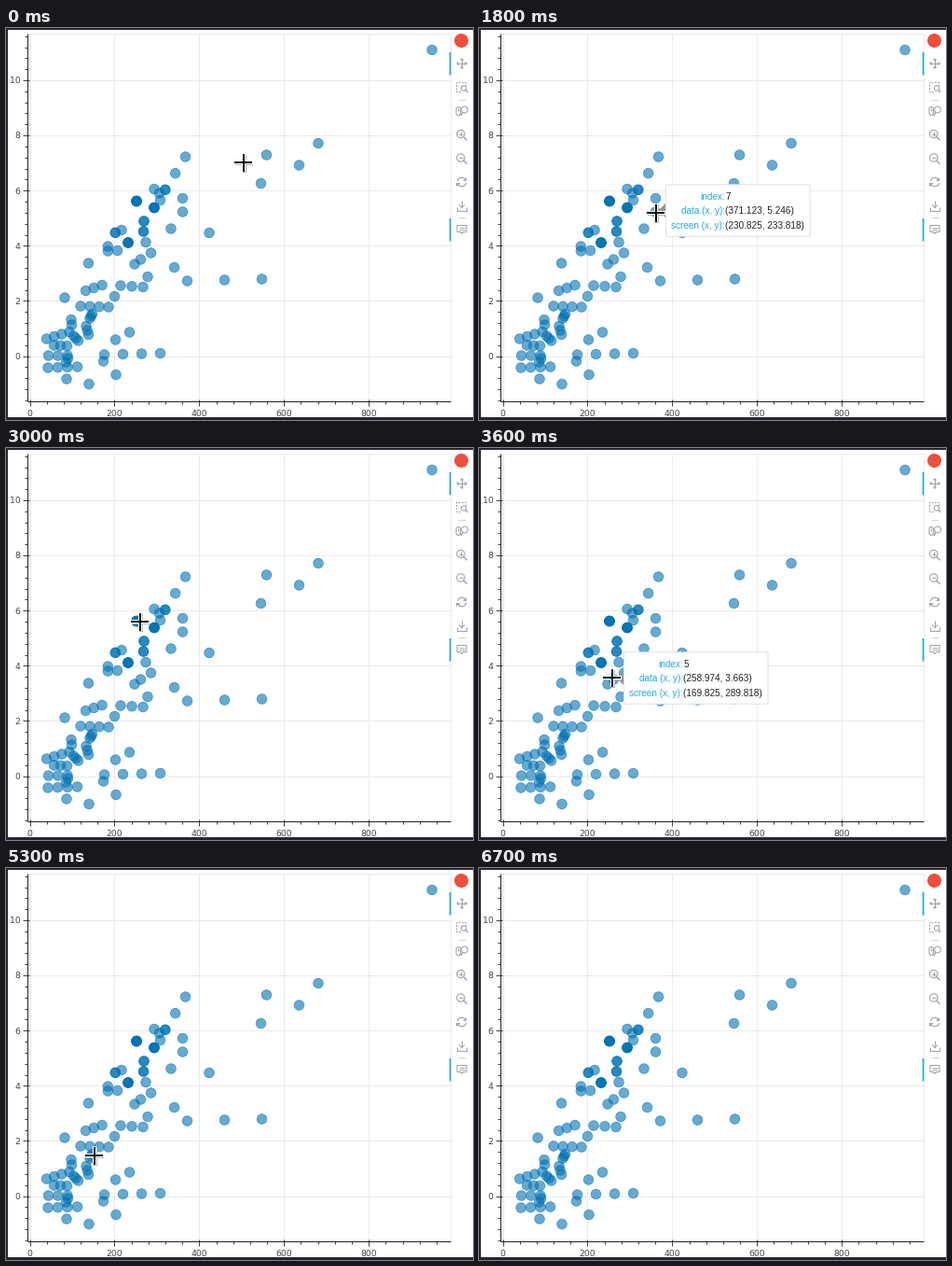
These frames come from a looping animation (501x420 px, 7.1 s). A matplotlib script:

```python
import numpy as np
import matplotlib.pyplot as plt
from matplotlib.animation import FuncAnimation
from matplotlib.patches import Arc, Circle, FancyBboxPatch, Polygon, Rectangle

W, H, DPI = 501, 420, 64
PT = 72 / DPI                      # points per pixel
STEP, FRAMES = 100, 71
X0, XS, Y0, YS = 25.6, 0.4545, 351.6, 29.56
LEFT, RIGHT, TOP, BOTTOM = 23.5, 477.5, 5.5, 399.5
DOT, TEAL, ICON, GRID, INK = '#0072b5', '#26aae1', '#a1a6a9', '#eaeaea', '#222222'

LONE = [
    (457, 23.5), (335, 123.5), (314.5, 147), (279.5, 136), (273.5, 166.5),
    (144.5, 248), (189.5, 182.5), (189.5, 197), (218, 219.5), (177, 215),
    (180.5, 256.5), (159, 172.5), (164.5, 177), (165.5, 184.5), (138, 253),
    (155.5, 241), (150, 229.5), (152, 266.5), (109.3, 234), (109.3, 239),
    (119.5, 238.5), (124, 216.5), (88.5, 252), (63, 289), (116.5, 287.5),
    (70, 312.5), (70.5, 318), (104.5, 357), (118, 371.5), (65, 376),
    (89, 381.5), (117.5, 334), (132.5, 326), (66.5, 354), (64.5, 358),
]
# x, y, copies
STACKS = [(140, 185.5, 6), (159, 192.5, 4), (131, 230, 4), (148, 207, 2),
          (147.5, 218, 2), (117.3, 219.3, 2), (170.8, 173.3, 1)]
# evenly spaced dots between two ends: x, y, x, y, count
CHAINS = [
    (192.5, 138, 170.8, 173.3, 3), (194.5, 271, 274.5, 269, 3),
    (105.5, 350, 165.5, 348.5, 4), (147, 277.5, 123, 276, 3),
    (85.5, 281.5, 103, 275.5, 3), (80, 298, 110, 299, 4),
    (92.5, 306.5, 90, 311, 3), (86, 319.5, 88.5, 328.5, 3),
    (72.5, 330, 77.5, 335, 3), (43.5, 333, 68, 325.5, 4),
    (51.5, 340, 65.5, 340.5, 3), (45.5, 351, 66, 351, 3),
    (45, 364, 76.5, 363, 4),
]
DOTS = np.vstack([LONE]
                 + [[(x, y)] * n for x, y, n in STACKS]
                 + [np.linspace(c[:2], c[2:4], c[4]) for c in CHAINS])

# pointer path: ms, x, y
PATH = np.array([
    (0, 255, 144), (400, 282, 138), (600, 282, 138), (900, 272, 168),
    (1000, 272, 168), (1100, 253, 178), (1800, 190, 198), (2000, 184, 191),
    (2100, 184, 191), (2200, 188, 184), (2400, 179, 182), (2600, 179, 182),
    (2900, 154, 182), (3000, 144, 186), (3150, 144, 187), (3400, 149, 228),
    (3550, 143.2, 243.3), (3600, 143, 246), (3900, 151, 265), (4000, 151, 267),
    (4450, 146.5, 277.56), (4500, 145, 278), (4750, 138, 254), (5000, 112, 299),
    (5100, 111, 300), (5200, 103, 306), (5300, 95, 308), (5450, 92.5, 309),
    (5800, 76, 332), (6000, 76, 332), (6100, 71, 338), (6300, 71, 338),
    (6400, 92, 240), (6600, 138, 10),
])
GONE = 6700                        # pointer has left the stage
LAG = 50                           # hover box trails the pointer
REACH = 5.7                        # hover distance around a dot

fig = plt.figure(figsize=(W / DPI, H / DPI), dpi=DPI, facecolor='white')
ax = fig.add_axes([0, 0, 1, 1])
ax.set_xlim(0, W)
ax.set_ylim(H, 0)
ax.axis('off')


def line(xs, ys, color, width=1.0, z=1, **kw):
    kw.setdefault('solid_capstyle', 'butt')
    return ax.plot(xs, ys, color=color, lw=width * PT, zorder=z, **kw)[0]


def label(x, y, s, size, color, ha, font, z=3):
    return ax.text(x, y, s, fontsize=size * PT, color=color, ha=ha,
                   va='baseline', family=font, zorder=z)


def shape(patch):
    return ax.add_patch(patch)


def draw_plot():
    for x, y, w, h in [(0, 0, W, 2), (0, 0, 2, H), (0, 417, W, 3)]:
        shape(Rectangle((x, y), w, h, color='#262633', lw=0, zorder=0))
    line([LEFT, RIGHT, RIGHT], [TOP, TOP, BOTTOM], GRID)
    for x, y in DOTS:
        shape(Circle((x, y), 5.3, color=DOT, alpha=0.6, lw=0.8 * PT, zorder=2))

    line([LEFT, LEFT], [TOP, BOTTOM], INK, z=3)
    line([LEFT, RIGHT], [BOTTOM, BOTTOM], INK, z=3)
    for k in range(25):
        x, major = X0 + XS * 40 * k, k % 5 == 0
        line([x, x], [BOTTOM - 2 * major, BOTTOM + 3.4 + 1.6 * major], INK, 0.85, 3)
        if major:
            line([x, x], [TOP, BOTTOM], GRID)
            label(x, 416, str(40 * k), 9.2, '#444444', 'center', 'DejaVu Sans')
    for k in range(-4, 30):
        y, major = Y0 - YS * 0.4 * k, k % 5 == 0
        line([LEFT - 3.4 - 1.6 * major, LEFT + 2 * major], [y, y], INK, 0.85, 3)
        if major:
            line([LEFT, RIGHT], [y, y], GRID)
            label(15.3, y + 3.3, str(2 * k // 5), 9.2, '#444444', 'right', 'DejaVu Sans')


def stroke(xs, ys, width=1.1):
    line(xs, ys, ICON, width)


def lens(x, y, r):
    shape(Circle((x, y), r, fill=False, ec=ICON, lw=1.1 * PT))
    d = 0.7 * r
    stroke([x + d, x + d + r * 0.9], [y + d, y + d + r * 0.9], 1.5)


def draw_toolbar():
    cx = 489
    shape(Circle((cx - 0.5, 13.5), 7.5, color='#ee4f3c', lw=0))
    for y in (26, 204):
        shape(Rectangle((475.7, y), 1.6, 24.5, color='#16a7d4', lw=0, zorder=4,
                        snap=False))
    for y in (76.5, 202.5):
        line([485, 493], [y, y], '#d3d3d3')

    # pan
    y = 38
    stroke([cx - 5, cx + 5], [y, y])
    stroke([cx, cx], [y - 5, y + 5])
    for dx, dy in [(1, 0), (-1, 0), (0, 1), (0, -1)]:
        tip = np.array([cx + 6 * dx, y + 6 * dy])
        base, side = tip - 2.6 * np.array([dx, dy]), 2.3 * np.array([dy, dx])
        shape(Polygon([tip, base + side, base - side], color=ICON, lw=0))

    # box zoom
    line([cx + 4, cx + 4, cx - 6, cx - 6, cx - 1], [62, 57.5, 57.5, 67.5, 67.5],
         ICON, 1.1, dashes=(1.8, 1.2))
    lens(cx + 2, 64.5, 2.7)

    # wheel zoom
    shape(FancyBboxPatch((cx - 6, 84.5), 4.4, 9, fill=False, ec=ICON, lw=1.1 * PT,
                         boxstyle='round,pad=0,rounding_size=2.2'))
    stroke([cx - 3.8, cx - 3.8], [86, 88.5])
    shape(Circle((cx + 3, 87.5), 3.4, fill=False, ec=ICON, lw=1.1 * PT))
    stroke([cx + 1, cx - 1], [90.2, 94], 1.5)

    # zoom in, zoom out
    for y, plus in [(113.5, True), (139, False)]:
        lens(cx - 1.2, y, 4.2)
        stroke([cx - 3.4, cx + 1], [y, y])
        if plus:
            stroke([cx - 1.2, cx - 1.2], [y - 2.2, y + 2.2])

    # reset
    y = 165
    for a, s in [(190, 1), (10, -1)]:
        shape(Arc((cx, y), 9.5, 9.5, theta1=a, theta2=a + 135, ec=ICON, lw=1.2 * PT))
        shape(Polygon([(cx + 5.5 * s, y - 5 * s), (cx + 5.5 * s, y - 0.8 * s),
                       (cx + 1.4 * s, y - 0.8 * s)], color=ICON, lw=0))

    # save
    stroke([cx, cx], [184.5, 192])
    stroke([cx - 3, cx, cx + 3], [189.5, 192.5, 189.5])
    stroke([cx - 5, cx - 5, cx + 5, cx + 5], [192, 195.5, 195.5, 192])

    # hover
    stroke([cx - 5, cx + 5, cx + 5, cx + 1.5, cx, cx - 1.5, cx - 5, cx - 5],
           [211.5, 211.5, 218.5, 218.5, 220.5, 218.5, 218.5, 211])
    for y in (213.7, 216.2):
        stroke([cx - 3, cx + 3], [y, y], 0.9)


def pointer(t):
    return np.array([np.interp(t, PATH[:, 0], PATH[:, k]) for k in (1, 2)])


def readout(x, y):
    """Data and screen coordinates under the pointer."""
    i, j = round((x - 143.2) / 0.8356), round((y - 243.3) / 0.8356)
    data = (258.974 + 1.8385 * i, 3.663 - 1.159 / 41 * j)
    return data, (169.825 + i, 289.818 + j)


def draw_tip(spot):
    dist = np.hypot(*(DOTS - spot).T)
    ids = np.flatnonzero(dist < REACH)
    if not len(ids):
        return []
    px, py = DOTS[dist.argmin()]
    data, screen = readout(*spot)
    coords = [('data (x, y):', '(%.3f, %.3f)' % data),
              ('screen (x, y):', '(%.3f, %.3f)' % screen)]
    w = 154.5 - 5.56 * (screen[0] < 100)
    h = 55.5 + 47.2 * (len(ids) - 1)
    cy = py - 1.5
    side = 1 if px < 250 else -1
    edge = px + 11 * side
    left = edge if side > 0 else edge - w
    top = cy - h / 2
    out = [
        shape(Polygon([(edge - 8 * side, cy), (edge, cy - 8), (edge, cy + 8)],
                      color='#909599', lw=0, zorder=5)),
        shape(FancyBboxPatch((left, top), w, h, fc=(1, 1, 1, 0.96), ec='#e2e2e2',
                             lw=PT, boxstyle='round,pad=0,rounding_size=1', zorder=6)),
    ]
    for k, idx in enumerate(ids):
        y = top + 27.75 + 47.2 * k
        if k:
            out.append(line([left + 5, left + w - 5], [y - 23.6] * 2, '#e5e5e5',
                            1, 7, dashes=(3, 2)))
        for r, (name, value) in enumerate([('index:', str(idx))] + coords):
            base = y + 15.5 * (r - 1) + 3.6
            for s, x, color, ha in [(name, 63.4, TEAL, 'right'),
                                    (value, 63.9, INK, 'left')]:
                out.append(label(left + x, base, s, 10, color, ha,
                                 'Liberation Sans', 7))
    return out


def draw_pointer(x, y):
    out = []
    layers = [(1, 9.5, 4, '#b5b5b5'), (0, 10, 4, 'white'), (0, 9.5, 2, 'black')]
    for z, (d, half, width, color) in enumerate(layers, 8):
        cx, cy = x + d, y + d
        out.append(line([cx - half, cx + half], [cy, cy], color, width, z))
        out.append(line([cx, cx], [cy - half, cy + half], color, width, z))
    return out


live = []


def update(i):
    while live:
        live.pop().remove()
    t = i * STEP
    if t < GONE:
        live.extend(draw_tip(pointer(t - LAG)))
        live.extend(draw_pointer(*pointer(t)))
    return live


draw_plot()
draw_toolbar()
anim = FuncAnimation(fig, update, frames=FRAMES, interval=STEP, repeat=True,
                     repeat_delay=0, init_func=lambda: update(0), blit=False)
plt.show()
```
